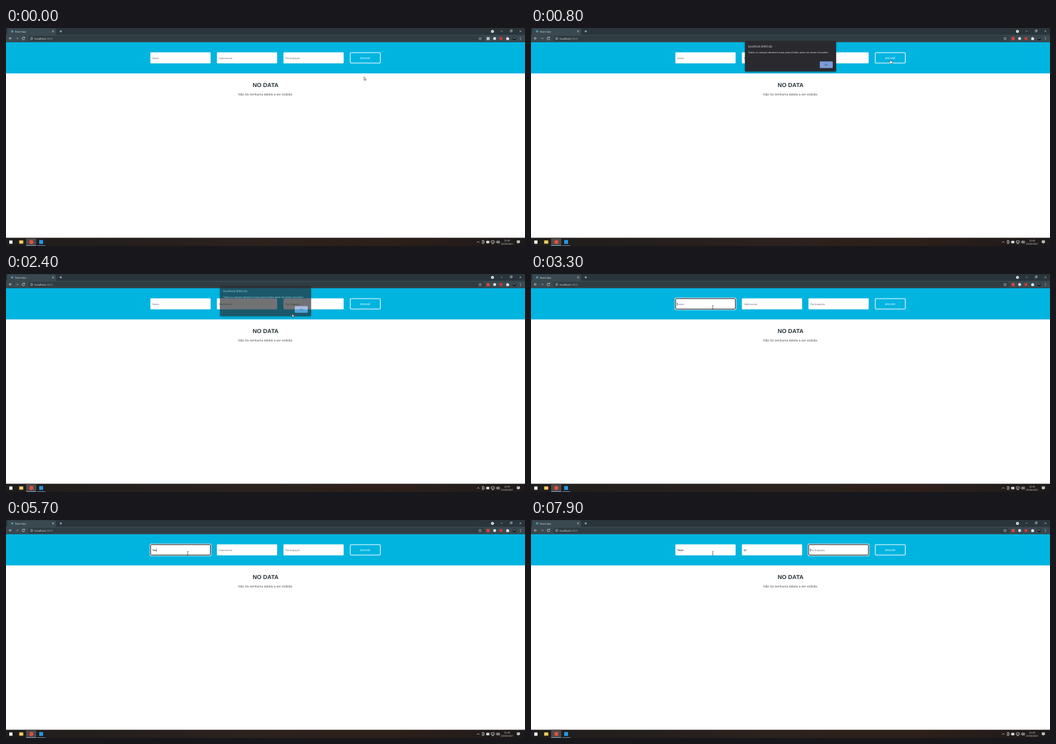
These frames come from a looping animation (798 by 336 pixels, 8000 ms). An HTML page:

```html
<!DOCTYPE html>
<html lang="pt-BR">
<head>
<meta charset="utf-8">
<title>Form demo</title>
<style>
  html, body { margin: 0; width: 100%; height: 100%; overflow: hidden; background: #fff; }
  svg { display: block; width: 798px; height: 336px; }
  text { text-rendering: geometricPrecision; white-space: pre; }
  .ui { font-family: "Open Sans", sans-serif; fill: #e8eaed; }
  .page { font-family: "Liberation Sans", Arial, sans-serif; }
  .line { fill: none; stroke: #dfe4e6; stroke-width: .7; }
</style>
</head>
<body>
<svg viewBox="0 0 798 336" xmlns="http://www.w3.org/2000/svg">
  <defs>
    <linearGradient id="bar">
      <stop offset="0" stop-color="#1f1d1c"/>
      <stop offset=".45" stop-color="#2b211d"/>
      <stop offset=".75" stop-color="#2d1f1a"/>
      <stop offset="1" stop-color="#1d1a19"/>
    </linearGradient>
    <filter id="shadow" x="-10%" y="-20%" width="120%" height="150%">
      <feDropShadow dx="0" dy="1" stdDeviation="1.3" flood-opacity=".5"/>
    </filter>
  </defs>

  <!-- window frame -->
  <rect width="798" height="11" fill="#29353b"/>
  <path d="M0 11Q2 11 2 9V2Q2 .5 3.500 .5H75.500Q77 .5 77 2V9Q77 11 79 11Z" fill="#3a4950"/>
  <rect y="10.500" width="798" height="11.500" fill="#3a4950"/>
  <rect x="34" y="12" width="702" height="8.600" rx="4.300" fill="#2f3c42"/>
  <circle cx="9.500" cy="5.200" r="1.700" fill="#4a9db5"/>
  <text class="ui" x="14" y="6.700" font-size="3.550">React App</text>
  <g class="line">
    <path d="M71.200 4l2.400 2.400m0-2.400l-2.400 2.400M82.400 5.200h3.600m-1.800-1.800v3.600"/>
    <path d="M760.600 5h3M775.200 3.800h2.300v2.300h-2.300zM776 3.700v-.8h2.300v2.300h-.8M789.600 3.800l2.600 2.600m0-2.600l-2.600 2.600" stroke-width=".5"/>
    <path d="M9 16H4.800m2-2l-2 2 2 2"/>
    <path d="M14.800 16h4.200m-2-2l2 2-2 2" opacity=".4"/>
    <path d="M28.300 14.800A2 2 0 1 0 28.700 16.700M28.700 13.600v1.500h-1.500"/>
    <circle cx="39.500" cy="16.200" r="1.800" stroke-width=".5"/>
    <path d="M39.500 16v1.200m0-2.100v.4" stroke-width=".5"/>
    <path d="M729 14l.7 1.500 1.600.2-1.200 1.100.3 1.600-1.400-.8-1.400.8.3-1.600-1.200-1.100 1.600-.2z" stroke-width=".45"/>
  </g>
  <circle cx="748" cy="5.200" r="2.200" fill="#f1f3f4"/>
  <path d="M747 4.700h2l-1 1.300z" fill="#29353b"/>
  <text class="ui" x="44.300" y="17.700" font-size="4.080">localhost<tspan fill="#98a3a8">:3000</tspan></text>
  <rect id="ext" x="739" y="14" width="4.600" height="4.600"/>
  <circle cx="751.300" cy="16.200" r="2.200" fill="#e3e7ea"/>
  <circle cx="761" cy="16.200" r="2.400" fill="#d03a35"/>
  <path d="M769.300 14.800h1.100a.8.8 0 0 1 1.600 0h1.100v1.100a.8.8 0 0 1 0 1.600v1.100h-3.800z" fill="#eef1f2"/>
  <circle cx="781.500" cy="16.200" r="2.700" fill="#1d2428"/>
  <path d="M779.100 15.800q2.400-2 4.800 0z" fill="#a7adab"/>
  <g fill="#e8eaed"><circle cx="791" cy="14.500" r=".5"/><circle cx="791" cy="16.200" r=".5"/><circle cx="791" cy="17.900" r=".5"/></g>

  <!-- page -->
  <rect y="22" width="798" height="48" fill="#00b4e0"/>
  <g id="fields" class="page"></g>
  <rect x="529.300" y="38" width="46.200" height="16" rx=".6" fill="none" stroke="#fff" stroke-width="1"/>
  <g class="page" text-anchor="middle">
    <text x="552.300" y="47.600" font-size="4.200" fill="#fff">ENVIAR</text>
    <text x="399.200" y="90.900" font-size="9" font-weight="700" fill="#263238">NO DATA</text>
    <text x="398.500" y="103.600" font-size="5" fill="#555">Não há nenhuma tabela a ser exibida</text>
  </g>

  <!-- alert -->
  <g id="alert" class="ui">
    <rect x="329" y="20" width="140" height="46.800" rx="1.300" fill="#292a2d" filter="url(#shadow)"/>
    <text x="334" y="30" font-size="4.440">localhost:3000 diz</text>
    <text x="334" y="38.700" font-size="3.710">Todos os campos deverem estar preenchidos antes de serem enviados!</text>
    <rect x="444" y="51.600" width="20" height="10.200" rx="1.200" fill="#7c9cd8"/>
    <text x="454" y="58" font-size="3.600" text-anchor="middle" style="fill:#28344a">OK</text>
  </g>

  <!-- taskbar -->
  <rect y="323.300" width="798" height="12.700" fill="url(#bar)"/>
  <rect x="31" y="323.300" width="15.500" height="12.700" fill="#514946"/>
  <path d="M31 335.600h15.500M48 335.600h12.500" stroke="#76b9ed" stroke-width=".8"/>
  <rect x="5" y="327.500" width="5" height="5" fill="#fff"/>
  <rect x="20.300" y="327.400" width="6.200" height="5" fill="#f4cf62"/>
  <circle cx="39" cy="329.800" r="3.100" fill="#dd5144"/>
  <rect x="51" y="326.800" width="6" height="6" fill="#2497e3"/>
  <g class="line" stroke-width=".6">
    <path d="M724.200 330.800l1.900-1.900 1.900 1.900"/>
    <path d="M732.300 327.500h2.400v4.600h-2.400zM734.700 329.800h1.300"/>
    <path d="M738.800 328.400h4v3h-4z" fill="#dfe4e6"/>
    <path d="M746.200 328h4.600v3h-4.600zM747 332.400h3"/>
    <path d="M754 329h1l1.300-1.200v4.200l-1.300-1.200h-1zM757.300 328.600q1 1.300 0 2.600M758.300 327.800q1.700 2.100 0 4.200"/>
  </g>
  <g class="ui" font-size="3.550" text-anchor="middle">
    <text x="770.500" y="328.700">22:49</text>
    <text x="770.500" y="334.300">23/06/2021</text>
  </g>
  <path d="M785.500 327.500h4.600v3.700h-2l-1.200 1.300v-1.300h-1.400z" fill="#f0f0f0"/>
  <path d="M786.300 328.700h3m-3 1.200h3" stroke="#2a211e" stroke-width=".4"/>

  <!-- pointers, hot spot at 0,0 -->
  <g id="pointer">
    <path id="arrow" d="M0 0v5l1.150-1 .8 1.800.9-.4-.8-1.750h1.550z" fill="#fff" stroke="#222" stroke-width=".5"/>
    <path id="hand" d="M-.6.500Q0-.5.600.500V2.400l2 .5q.6.200.5.900L2.700 6H-.5L-2 3.800q0-.8.700-.6l.7.600z" fill="#fff" stroke="#222" stroke-width=".45"/>
    <path id="beam" d="M-1.100-2.900q1.100 0 1.100.6 0-.6 1.100-.6M0-2.300v4.600M-1.100 2.900q1.100 0 1.100-.6 0 .6 1.100.6" fill="none" stroke="#222" stroke-width=".55"/>
  </g>
</svg>
<script>
const LOOP = 8000, STEP = 100;
const $ = id => document.getElementById(id);
const between = (t, a, b) => t >= a && t < b;

// typed: [time, value]; focus: [from, to]
const FIELDS = [
  { x: 222, label: 'Nome', focus: [3200, 6500],
    typed: [[5300, 'T'], [5500, 'Te'], [5700, 'Tes'], [5900, 'Test'], [6100, 'Teste']] },
  { x: 324.3, label: 'Sobrenome', focus: [6500, 7900], typed: [[6900, '0'], [7200, '01']] },
  { x: 426.6, label: 'Participação', focus: [7900, LOOP], typed: [] }
];

// time, x, y
const PATH = [
  [0, 550.4, 75.3], [100, 550.4, 75.3], [500, 552.7, 48.6], [1000, 552.7, 48.6],
  [1800, 453, 58], [2000, 453, 58], [2100, 452, 58], [2300, 452, 58],
  [2400, 440, 61.5], [3100, 279.5, 51.3], [LOOP, 279.5, 51.3]
];

const CARET_OFF = [[4200, 4800], [7700, 7900]];

function make(tag, attrs, parent) {
  const el = document.createElementNS('http://www.w3.org/2000/svg', tag);
  for (const key in attrs) el.setAttribute(key, attrs[key]);
  return parent.appendChild(el);
}

for (const f of FIELDS) {
  const g = make('g', {}, $('fields'));
  make('rect', { x: f.x, y: 37.6, width: 92.6, height: 16.8, rx: 1, fill: '#fff' }, g);
  f.ring = make('g', { fill: 'none' }, g);
  make('rect', { x: f.x - .2, y: 37.4, width: 93, height: 17.2, rx: 1.2, stroke: '#fff', 'stroke-width': 1.7 }, f.ring);
  make('rect', { x: f.x + .3, y: 37.9, width: 92, height: 16.2, rx: .9, stroke: '#101010', 'stroke-width': 1 }, f.ring);
  f.text = make('text', { x: f.x + 2.8, y: 47.5, 'font-size': 4.06 }, g);
  f.caret = make('rect', { y: 43.8, width: .5, height: 4.8, fill: '#111' }, g);
}

function drawField(f, t) {
  const hit = f.typed.filter(([at]) => at <= t).pop();
  const value = hit ? hit[1] : '';
  const focused = between(t, ...f.focus);
  const blink = CARET_OFF.some(([a, b]) => between(t, a, b));
  f.text.textContent = value || f.label;
  f.text.setAttribute('fill', value ? '#111' : '#777');
  f.ring.style.display = focused ? '' : 'none';
  f.caret.style.display = focused && !blink ? '' : 'none';
  const advance = value ? f.text.getComputedTextLength() : 0;
  f.caret.setAttribute('x', f.x + 2.6 + advance);
}

function pointerAt(t) {
  const i = PATH.findIndex(p => p[0] > t);
  const [t0, x0, y0] = PATH[i - 1], [t1, x1, y1] = PATH[i];
  const k = (t - t0) / (t1 - t0), e = k * k * (3 - 2 * k);
  return [x0 + (x1 - x0) * e, y0 + (y1 - y0) * e];
}

function drawPointer(t) {
  const [x, y] = pointerAt(t);
  const inRow = between(y, 38, 54.5);
  const overButton = inRow && between(x, 529, 576);
  const overField = t > 2400 && inRow && FIELDS.some(f => between(x, f.x, f.x + 92.6));
  const kind = overButton ? 'hand' : overField ? 'beam' : 'arrow';
  for (const id of ['arrow', 'hand', 'beam']) $(id).style.display = id === kind ? '' : 'none';
  $('pointer').setAttribute('transform', `translate(${x} ${y})`);
}

function drawAlert(t) {
  const closing = between(t, 2400, 2500), opening = between(t, 600, 700);
  const alpha = closing ? .66 : opening ? .6 : between(t, 700, 2400) ? 1 : 0;
  $('alert').setAttribute('opacity', alpha);
  $('alert').setAttribute('transform', `translate(0 ${closing || opening ? -2 : 0})`);
}

function draw(now) {
  const t = Math.floor(now % LOOP / STEP) * STEP;
  FIELDS.forEach(f => drawField(f, t));
  drawAlert(t);
  drawPointer(t);
  $('ext').setAttribute('fill', t < 400 ? '#b9c0c4' : '#e0423c');
}

function tick() {
  draw(performance.now());
  requestAnimationFrame(tick);
}
tick();
</script>
</body>
</html>
```
